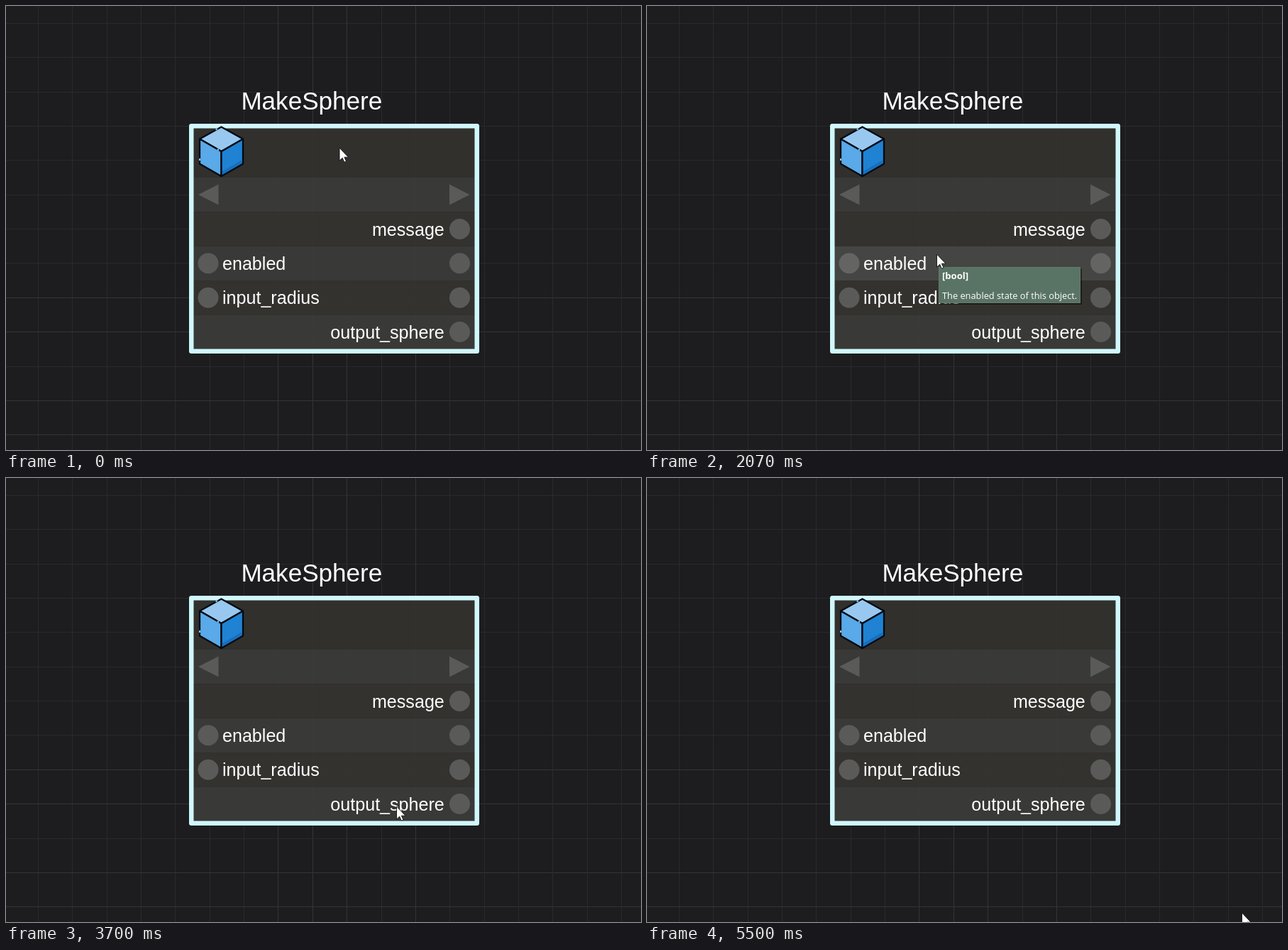
These frames come from a looping animation (895 by 626 pixels, 5570 ms). An HTML page:

```html
<!DOCTYPE html>
<html lang="en">
<head>
<meta charset="utf-8">
<title>Node tooltips</title>
<style>
  html, body { margin: 0; width: 100%; height: 100%; overflow: hidden; background: #1d1d1f; }
  svg { display: block; width: 895px; height: 626px; }
  text { fill: #fff; font: 25.1px "Liberation Sans", Arial, sans-serif; white-space: pre; }
  .title { font-size: 35.1px; }
  .tip text { font: 12.8px "Open Sans", "Noto Sans", sans-serif; }
  .tip .type { font-weight: 700; font-size: 13.1px; }
</style>
</head>
<body>
<svg viewBox="0 0 895 626">
  <g id="grid"></g>
  <g id="rows"></g>
  <g id="ports" fill="#5a5a59"></g>
  <rect id="hover" x="264" width="396" fill="#fff" opacity=".06"/>
  <rect x="261.25" y="169.25" width="402.5" height="317.5" fill="none" stroke="#d0f8fc" stroke-width="6.5" stroke-linejoin="round"/>
  <g transform="translate(303.5 205)" stroke="#020a12" stroke-width="2.3" stroke-linejoin="round">
    <path fill="#98c8f0" d="M0 0-30.5-17.5 0-34.5 30.5-17.5Z"/>
    <path fill="#5aa9e8" d="M0 0V35L-30.5 17.5v-35Z"/>
    <path fill="#1f82d2" d="M0 0V35L30.5 17.5v-35Z"/>
    <path fill="#196ebc" stroke="none" d="M1.5 28 29.3 12v4.5L1.5 32.5Z"/>
    <path fill="none" stroke="#8fc4f0" stroke-width="2" d="M-8-30.5l2.5-1.4M-5.5-3l2 1.1M-30.5 10v3"/>
  </g>
  <g id="labels"></g>
  <g id="tips"></g>
  <path id="cursor" fill="#fff" stroke="#111" stroke-width=".9" d="M.5 0V18L4.7 14.2 7.3 20.2 10 19 7.4 13.2H13Z"/>
</svg>
<script>
const LOOP = 5570, TICK = 70, CELL = 48.35;
const $ = id => document.getElementById(id);

function add(parent, tag, attrs, text) {
  const el = document.createElementNS("http://www.w3.org/2000/svg", tag);
  for (const name in attrs) el.setAttribute(name, attrs[name]);
  if (text) el.textContent = text;
  return parent.appendChild(el);
}

// Background grid
for (let i = 0; i < 18; i++) {
  const x = Math.round(45 + i * CELL), y = Math.round(24 + i * CELL);
  const shade = bright => bright ? "#343437" : "#2a2a2c";
  add($("grid"), "rect", { x, y: 0, width: 1, height: 626, fill: shade(i > 6 && i < 12 && i != 10) });
  add($("grid"), "rect", { x: 0, y, width: 895, height: 1, fill: shade(i > 7 && i != 10) });
}

// Node rows: the header, the flow arrows, then four attributes
const rowTop = i => i ? 242 + (i - 1) * CELL : 172;
const rowHeight = i => rowTop(i + 1) - rowTop(i);
for (let i = 0; i < 6; i++) add($("rows"), "rect", {
  x: 262, y: rowTop(i), width: 400, height: rowHeight(i),
  fill: i % 2 ? "#3a3a38" : i ? "#353330" : "#32312e", opacity: .97
});
add($("ports"), "path", { d: "M271 266l28.5-14.5v29ZM653.5 266l-28.5-14.5v29Z" });

["message", "enabled", "input_radius", "output_sphere"].forEach((name, i) => {
  const cy = 314.5 + i * CELL, isInput = i == 1 || i == 2;
  add($("ports"), "circle", { cx: 639.5, cy, r: 14.5 });
  if (isInput) add($("ports"), "circle", { cx: 285, cy, r: 14.5 });
  add($("labels"), "text", {
    x: isInput ? 305 : 617.8, y: cy + 9, "text-anchor": isInput ? "start" : "end"
  }, name);
});
add($("labels"), "text", { class: "title", x: 331.4, y: 146 }, "MakeSphere");

function makeTip(from, to, x, y, width, type, ...lines) {
  const el = add($("tips"), "g", { class: "tip" });
  const height = (type ? 32 : 5) + lines.length * 19;
  add(el, "rect", { x: x + 2, y: y + 2, width, height, fill: "#000", opacity: .45 });
  add(el, "rect", { x: x + .5, y: y + .5, width: width - 1, height: height - 1, fill: "#597465", stroke: "#637a6d" });
  if (type) add(el, "text", { x: x + 5, y: y + 17, class: "type" }, type);
  lines.forEach((line, i) => add(el, "text", { x: x + 5, y: y + (type ? 45 : 17) + i * 19 }, line));
  return { el, from, to };
}
const tips = [
  makeTip(570, 1860, 471, 218, 118.5, "", "Makes a sphere in", "Vonu."),
  makeTip(2070, 2350, 411, 368, 200, "[bool]", "The enabled state of this object."),
  makeTip(2490, 3360, 363, 432, 192, "[float]", "The input radius of the sphere."),
  makeTip(4100, 5230, 574, 476, 196.5, "[str]", "Name of the sphere created by", "this action.")
];

// Pointer moves: start, end, target x, target y
const moves = [
  [1660, 1730, 471, 201],
  [1730, 2070, 408, 350],
  [2070, 2280, 362, 414],
  [3220, 3700, 550, 463],
  [3760, 3900, 573, 458],
  [5090, 5500, 838, 613]
];
// Hovered row: row, start, end
const hovers = [[1, 1870, 1940], [2, 1940, 2010], [3, 2010, 2210], [4, 2210, 3360], [5, 3830, 5230]];

function pointerAt(time) {
  let x = 469.5, y = 200;
  for (const [from, to, toX, toY] of moves) {
    if (time < from) break;
    const p = time >= to ? 1 : Math.floor((time - from) / TICK) * TICK / (to - from);
    const eased = p * p * (3 - 2 * p);
    x += (toX - x) * eased;
    y += (toY - y) * eased;
  }
  return [x, y];
}

const show = (el, on) => el.style.display = on ? "" : "none";

function draw(time) {
  $("cursor").setAttribute("transform", `translate(${pointerAt(time)})`);
  for (const { el, from, to } of tips) show(el, time >= from && time < to);
  const hover = hovers.find(([, from, to]) => time >= from && time < to);
  show($("hover"), hover);
  if (!hover) return;
  $("hover").setAttribute("y", rowTop(hover[0]));
  $("hover").setAttribute("height", rowHeight(hover[0]));
}

const start = performance.now();
function frame() {
  draw((performance.now() - start) % LOOP);
  requestAnimationFrame(frame);
}
frame();
</script>
</body>
</html>
```
